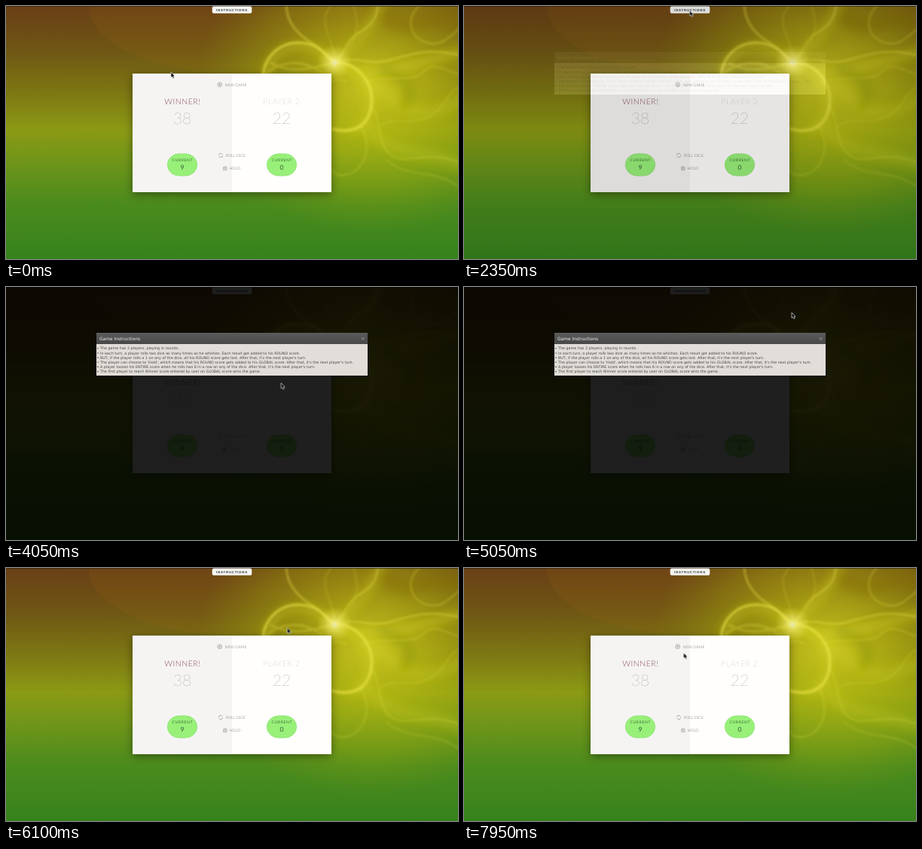
An HTML page that plays this animation: 600x337 px, repeating every 8 s.

```html
<!DOCTYPE html>
<html lang="en">
<head>
<meta charset="utf-8">
<title>Dice game</title>
<style>
html, body { margin: 0; width: 100%; height: 100%; overflow: hidden; background: #4a7d1c; }
svg { position: absolute; left: 0; top: 0; width: 600px; height: 337px; }
text { text-rendering: geometricPrecision; }
.card { filter: drop-shadow(0 3px 6px rgba(0, 0, 0, .4)); }
.lato { font-family: Lato, sans-serif; text-anchor: middle; }
.name { font-size: 10.56px; letter-spacing: .53px; font-weight: 100; fill: #807477; }
.winner { font-weight: 300; fill: #8a4c5c; }
.score { font-size: 21.1px; font-weight: 100; fill: #80686c; }
.label { font-size: 5px; letter-spacing: .68px; fill: #3c6a38; }
.points { font-size: 8.6px; fill: #355c35; }
.btn { font: 300 5.28px Lato, sans-serif; fill: #6c6466; }
.icon { fill: none; stroke: #8b8587; stroke-width: .6; }
.help { font: bold 4.35px "Liberation Sans", Arial, sans-serif; letter-spacing: .77px; fill: #333; }
.modal text { font: 4.85px "DejaVu Sans", sans-serif; fill: #4b4845; }
.modal .title { font-size: 5.9px; fill: #f2f2f2; }
.modal .close { font-size: 7px; fill: #a5a5a5; }
.wisps { fill: none; stroke-linecap: round; }

.modal { animation: modal 8s linear infinite; }
@keyframes modal {
  0%, 28.75% { opacity: 0; }
  34.375%, 68.749% { opacity: 1; }
  68.75%, 100% { opacity: 0; }
}
.cursor { animation: cursor 8s linear infinite; }
@keyframes cursor {
  0%, .5% { transform: translate(219px, 88px); }
  3.125%, 10.6% { transform: translate(211px, 89px); }
  15.625% { transform: translate(256px, 80px); }
  21.25% { transform: translate(286px, 24px); }
  23.125%, 37.5% { transform: translate(299.5px, 6px); }
  41.25% { transform: translate(136px, 82px); }
  47.5%, 47.8% { transform: translate(540px, 219px); }
  51.5% { transform: translate(312px, 100px); }
  55%, 57.7% { transform: translate(531px, 163px); }
  60%, 61.4% { transform: translate(447px, 46px); }
  63.1%, 73.3% { transform: translate(435px, 34px); }
  76.25% { transform: translate(373.5px, 79.5px); }
  83.75% { transform: translate(312px, 184px); }
  86.2%, 88.9% { transform: translate(306px, 205px); }
  99.3%, 100% { transform: translate(291.5px, 113px); }
}
</style>
</head>
<body>
<svg viewBox="0 0 600 337">
  <defs>
    <linearGradient id="sky" x2="0" y2="1">
      <stop offset="0" stop-color="#693f16"/>
      <stop offset=".18" stop-color="#6f5714"/>
      <stop offset=".36" stop-color="#7f7b13"/>
      <stop offset=".49" stop-color="#8b9a14"/>
      <stop offset=".6" stop-color="#739619"/>
      <stop offset=".78" stop-color="#4b8b1d"/>
      <stop offset="1" stop-color="#36821d"/>
    </linearGradient>
    <radialGradient id="glow">
      <stop offset="0" stop-color="#d6d424" stop-opacity=".85"/>
      <stop offset=".35" stop-color="#bfc012" stop-opacity=".62"/>
      <stop offset=".7" stop-color="#a6b00c" stop-opacity=".32"/>
      <stop offset="1" stop-color="#8a9a10" stop-opacity="0"/>
    </radialGradient>
    <radialGradient id="core">
      <stop offset="0" stop-color="#fff9a0" stop-opacity=".8"/>
      <stop offset="1" stop-color="#f0e840" stop-opacity="0"/>
    </radialGradient>
    <linearGradient id="bar" x2="0" y2="1">
      <stop offset="0" stop-color="#5b5b5b"/>
      <stop offset="1" stop-color="#484848"/>
    </linearGradient>
    <filter id="soft" filterUnits="userSpaceOnUse" x="280" y="-30" width="350" height="400"><feGaussianBlur stdDeviation="1.4"/></filter>
    <filter id="haze" filterUnits="userSpaceOnUse" x="280" y="-30" width="350" height="400"><feGaussianBlur stdDeviation="6"/></filter>
  </defs>

  <rect width="600" height="337" fill="url(#sky)"/>
  <ellipse cx="300" cy="0" rx="190" ry="90" fill="#a06a10" opacity=".12"/>
  <ellipse cx="485" cy="105" rx="235" ry="200" fill="url(#glow)"/>
  <g class="wisps" filter="url(#haze)" stroke="#d8d61e">
    <path d="M345 92C352 50 400 40 436 75S600 58 610 60" stroke-width="12" opacity=".38"/>
    <path d="M436 75C470 50 490 20 500-8M440 80C500 90 490 150 462 165" stroke-width="13" opacity=".3"/>
    <path d="M480 160C505 205 570 190 610 215M500 110C530 150 570 150 610 120" stroke-width="17" opacity=".22"/>
    <path d="M505 15C540 45 570 0 600 25" stroke-width="22" stroke="#806800" opacity=".3"/>
    <path d="M500 85C530 92 545 110 530 130" stroke-width="16" stroke="#7c8800" opacity=".3"/>
  </g>
  <g class="wisps" filter="url(#soft)" stroke="#eee64a">
    <path d="M341 92C344 66 365 47 391 49S424 65 436 75" stroke-width="3.2" opacity=".6"/>
    <path d="M436 75C472 76 491 108 484 138S451 168 434 164" stroke-width="4" opacity=".62"/>
    <path d="M434 164C414 151 410 124 421 110S442 96 452 101" stroke-width="2" opacity=".3"/>
    <path d="M372-3C372 24 390 40 407 50S425 70 436 75" stroke-width="2.6" opacity=".45"/>
    <path d="M436 75C466 65 482 80 510 72S560 55 604 66" stroke-width="2.4" opacity=".42"/>
    <path d="M436 75C452 60 452 45 471 34S492 12 494-3" stroke-width="2.4" opacity=".4"/>
    <path d="M436 75C438 50 420 35 424 12L433-3M437 75C470 50 470 22 460-3" stroke-width="1.6" opacity=".24"/>
    <path d="M551-3C530 15 535 40 556 48S588 42 604 28" stroke-width="2" opacity=".32"/>
    <path d="M352 76C380 92 410 82 436 75M345 90C370 70 395 72 420 89" stroke-width="2.4" opacity=".34"/>
    <path d="M484 132C499 148 491 185 512 199S560 190 604 209" stroke-width="2" opacity=".26"/>
    <path d="M470 158C490 192 472 222 450 225S424 205 433 189" stroke-width="2.4" opacity=".22"/>
    <path d="M496 160C520 145 535 160 560 148S586 112 604 107M505 205C535 232 570 215 604 243" stroke-width="2" opacity=".2"/>
    <path d="M472 102C500 91 540 103 554 88S580 85 604 92" stroke-width="2" opacity=".25"/>
  </g>
  <circle cx="436" cy="75" r="24" fill="url(#core)"/>
  <circle cx="436" cy="75.5" r="3.6" fill="#e6e4a0" opacity=".75"/>
  <rect width="600" height="1" fill="#24200f" opacity=".6"/>

  <rect x="273.7" y=".5" width="52.6" height="9.2" rx="2" fill="#f6f6f4"/>
  <text class="help" x="279" y="6.6">INSTRUCTIONS</text>

  <g class="card">
    <rect x="168" y="90" width="264" height="158" fill="#fffefd"/>
    <rect x="168" y="90" width="132" height="158" fill="#f5f4f3"/>
  </g>
  <g class="lato">
    <text class="name winner" x="234.3" y="131.2">WINNER!</text>
    <text class="name" x="366" y="131.2">PLAYER 2</text>
    <text class="score" x="234" y="156.6">38</text>
    <text class="score" x="366" y="156.6">22</text>
    <g fill="#98f079" stroke="#83d968" stroke-width=".5">
      <rect x="214.2" y="196.7" width="39.6" height="29.6" rx="16" ry="14.8"/>
      <rect x="346.2" y="196.7" width="39.6" height="29.6" rx="16" ry="14.8"/>
    </g>
    <text class="label" x="234.3" y="207.2">CURRENT</text>
    <text class="label" x="366.3" y="207.2">CURRENT</text>
    <text class="points" x="234" y="218.4">9</text>
    <text class="points" x="366" y="218.4">0</text>
  </g>
  <text class="btn" x="290.6" y="106.7">NEW GAME</text>
  <text class="btn" x="292" y="200.9">ROLL DICE</text>
  <text class="btn" x="296.4" y="217.9">HOLD</text>
  <g class="icon">
    <path d="M281.7 104.7h4M283.7 102.7v4"/>
    <circle cx="283.7" cy="104.7" r="2.9"/>
    <circle cx="285" cy="199" r="2.7" stroke-dasharray="7 1.48"/>
    <path d="M290 214.5h-1.4v4h4.4v-4h-1.4M290.8 213v4M289.6 215.9l1.2 1.2 1.2-1.2"/>
  </g>

  <g class="modal">
    <rect width="600" height="337" opacity=".88"/>
    <rect x="120" y="61" width="360" height="57" fill="#e1ddd8"/>
    <rect x="120" y="61" width="360" height="15" fill="url(#bar)"/>
    <text class="title" x="124" y="70.5">Game Instructions</text>
    <text class="close" x="470.7" y="71.1">×</text>
    <g fill="#4b4845">
      <circle cx="122" cy="81.8" r=".8"/><circle cx="122" cy="88" r=".8"/><circle cx="122" cy="94.1" r=".8"/>
      <circle cx="122" cy="100.3" r=".8"/><circle cx="122" cy="106.4" r=".8"/><circle cx="122" cy="112.6" r=".8"/>
    </g>
    <text x="125" y="83.4">The game has 2 players, playing in rounds.</text>
    <text x="125" y="89.6">In each turn, a player rolls two dice as many times as he whishes. Each result get added to his ROUND score.</text>
    <text x="125" y="95.7">BUT, if the player rolls a 1 on any of the dice, all his ROUND score gets lost. After that, it's the next player's turn.</text>
    <text x="125" y="101.9">The player can choose to 'Hold', which means that his ROUND score gets added to his GLOBAL score. After that, it's the next player's turn.</text>
    <text x="125" y="108">A player looses his ENTIRE score when he rolls two 6 in a row on any of the dice. After that, it's the next player's turn.</text>
    <text x="125" y="114.2">The first player to reach Winner score entered by user on GLOBAL score wins the game.</text>
  </g>

  <path class="cursor" d="M0 0V7.2L1.6 6 2.8 8.4 4.2 7.7 3.2 5.4 5 5.2Z" fill="#0b0b0b" stroke="#f2f2f2" stroke-width=".65" stroke-linejoin="round"/>
</svg>
</body>
</html>
```
